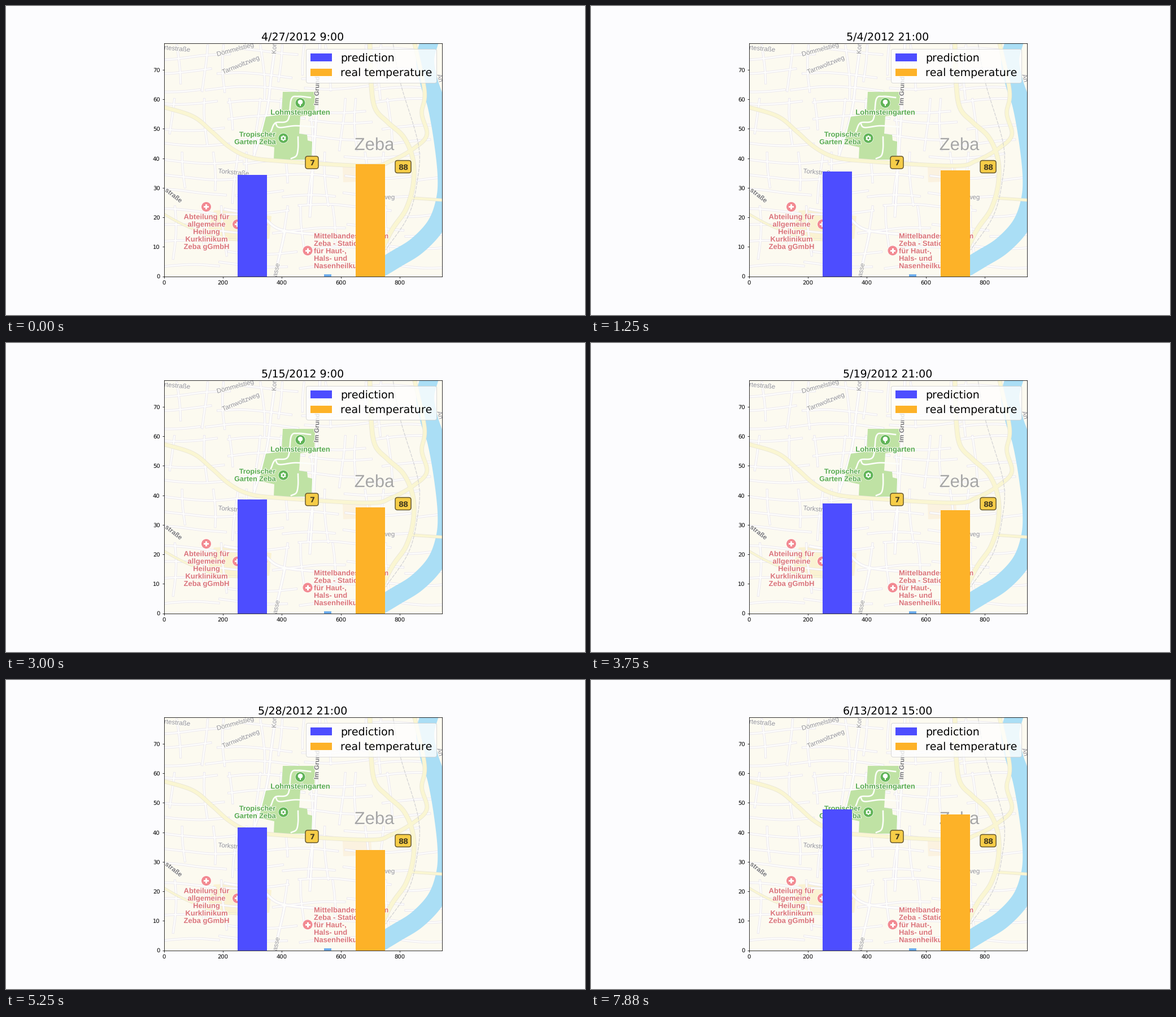
Animation of 1025 by 547 pixels, one loop 8 s. Source, as a matplotlib script:

```python
import numpy as np
import matplotlib.pyplot as plt
from matplotlib.animation import FuncAnimation
from matplotlib.patches import Circle, FancyBboxPatch, Polygon, Rectangle
from matplotlib.patheffects import withStroke

W, H, DPI = 1025, 547, 64
FRAMES, STEP = 64, 125
LEFT, RIGHT, TOP, BOTTOM = 279.5, 771.5, 66, 478.5
PX = 72 / DPI                      # points per pixel
BIG = 19.05 * PX

PAPER, LAND = "#fcfcfe", "#fcfaf0"
BLUE, ORANGE = "#4d4dff", "#fdb228"
GREEN, LEAF, PINK, RED = "#5fb356", "#58aa52", "#f28a92", "#da747b"
GRAY, DARK = "#92929a", "#77777c"

plt.rcParams["text.hinting"] = "none"
plt.rcParams["text.hinting_factor"] = 1
fig = plt.figure(figsize=(W / DPI, H / DPI), dpi=DPI, facecolor=PAPER)
box = [LEFT / W, 1 - BOTTOM / H, (RIGHT - LEFT) / W, (BOTTOM - TOP) / H]
rng = np.random.default_rng(7)

# The map is drawn in stage pixels, the chart above it in data units.
city = fig.add_axes(box, facecolor=LAND)
city.set(xlim=(LEFT, RIGHT), ylim=(BOTTOM, TOP), xticks=[], yticks=[])
city.spines[:].set_visible(False)


def smooth(points, n=10):
    """Catmull-Rom curve through the points."""
    p = np.array(points, float)
    p = np.vstack([2 * p[0] - p[1], p, 2 * p[-1] - p[-2]])
    t = np.linspace(0, 1, n, endpoint=False)[:, None]
    parts = []
    for a, b, c, d in zip(p, p[1:], p[2:], p[3:]):
        parts.append(0.5 * (2 * b + (c - a) * t + (2 * a - 5 * b + 4 * c - d) * t**2
                            + (3 * b - a - 3 * c + d) * t**3))
    return np.vstack(parts + [p[-2:-1]])


def line(points, width, color, z, **kw):
    x, y = smooth(points).T
    city.plot(x, y, color=color, lw=width * PX, zorder=z, **kw)


def street(*points, width=2.4):
    line(points, width + 1.6, "#e8e4ef", 2)
    line(points, width, "#fefefc", 3)


def avenue(*points, width=6):
    line(points, width + 1.6, "#eae6d6", 5)
    line(points, width, "#faf6d2", 5.5)


def area(points, color, z):
    city.add_patch(Polygon(points, fc=color, ec="none", zorder=z))


def disc(x, y, r, color, z=9):
    city.add_patch(Circle((x, y), r, fc=color, ec="none", zorder=z))


def block(x, y, w, h, color="white"):
    city.add_patch(Rectangle((x - w / 2, y - h / 2), w, h, fc=color, zorder=9))


def label(x, y, text, size=11.6, color=GRAY, rot=0, ha="center", weight="normal"):
    t = city.text(x, y, text, fontsize=size * PX, color=color, rotation=rot,
                  ha=ha, va="center", family="Liberation Sans", zorder=9,
                  weight=weight, clip_on=True, rotation_mode="anchor")
    t.set_path_effects([withStroke(linewidth=2 * PX, foreground="#fefdf6")])


def lines(x, y, text, color, ha="center", size=13):
    for i, row in enumerate(text.split("\n")):
        label(x, y + 13.2 * i, row, size, color, ha=ha, weight="bold")


def pin(x, y, color):
    disc(x, y, 9.2, "white", 7)
    disc(x, y, 8.5, color, 8)


def clinic(x, y):
    pin(x, y, PINK)
    block(x, y, 9, 3)
    block(x, y, 3, 9)


def shield(x, y, text, w):
    city.add_patch(FancyBboxPatch((x - w / 2 + 4, y - 7), w - 8, 14,
                                  boxstyle="round,pad=4", fc="#f6cd48",
                                  ec="#66572e", lw=1.5 * PX, zorder=8))
    city.text(x, y + 0.5, text, fontsize=12.5 * PX, weight="bold", color="#453b20",
              ha="center", va="center_baseline", zorder=9)


def draw_side_streets():
    """Loose net of short bent streets."""
    for y in np.arange(84, 470, 31):
        x = LEFT - 20
        while x < 730:
            run = rng.uniform(80, 170)
            xs = x + run * np.linspace(0, 1, 4)
            ys = y + rng.uniform(-9, 9) + 6 * np.sin(xs / 45 + y)
            street(*zip(xs, ys))
            x += run + rng.uniform(0, 25)
    for x in np.arange(306, 700, 46):
        for y in np.arange(70, 440, 95):
            ys = y + rng.uniform(50, 100) * np.linspace(0, 1, 4)
            xs = x + rng.uniform(-14, 14) + 6 * np.sin(ys / 40 + x)
            street(*zip(xs, ys))


def draw_main_roads():
    street((478, 60), (470, 120), (461, 190), (438, 268), width=3.2)
    street((556, 60), (552, 150), (544, 276), (538, 372), width=3.2)
    street((388, 360), (450, 372), (494, 398), (620, 408), width=3.6)
    street((494, 398), (486, 434), (474, 484), width=3.2)
    avenue((272, 177), (330, 195), (364, 222), (396, 250), (430, 267), (480, 274),
           (640, 283), (682, 274), (722, 252), (745, 228), (736, 190), (741, 150), (722, 60))
    avenue((644, 60), (646, 130), (653, 180), (676, 206), (704, 232), (720, 270),
           (721, 315), (708, 360), (680, 402), (640, 485), width=7)
    avenue((272, 364), (316, 388), (372, 410), (408, 414), width=3)
    avenue((720, 340), (778, 344), width=4)
    line([(684, 60), (698, 135), (730, 245), (728, 310), (712, 372), (672, 432)],
         1.2, "#d2d2d4", 6, ls=(0, (5, 1.5)))


def draw_nature():
    line([(751, 58), (742, 95), (749, 135), (762, 175), (773, 235), (780, 300),
          (777, 345), (761, 388), (728, 424), (690, 448), (650, 472)], 32, "#aadef5", 4)
    area([(490, 152), (547, 152), (546, 192), (521, 195), (519, 226), (533, 228),
          (534, 238), (542, 240), (541, 272), (474, 272), (475, 250), (448, 244),
          (460, 196), (488, 192)], "#bfe2a4", 4)
    for path in ([(469, 222), (477, 207), (499, 202), (505, 165), (517, 160), (539, 162)],
                 [(477, 207), (484, 215), (512, 212), (545, 214)],
                 [(517, 232), (517, 252), (514, 265), (505, 270)]):
        line(path, 2.6, "#fdfefa", 4.5)
    area([(368, 362), (412, 360), (470, 372), (466, 412), (392, 414), (358, 394)], "#faf2d2", 1)
    area([(596, 284), (646, 281), (648, 310), (597, 312)], "#fbf2e0", 1)


def draw_labels():
    label(280, 74, "rtestraße", rot=-5, ha="left")
    label(407, 77, "Dömmelstieg", rot=15)
    label(417, 104, "Tarnwoltzweg", rot=22)
    label(475, 85, "Korn", rot=88, ha="left")
    label(550, 176, "Im Grunde", color=DARK, rot=88, ha="left", weight="bold")
    label(404, 295, "Torkstraße", rot=-5)
    label(297, 336, "straße", color=DARK, rot=-38, weight="bold")
    label(667, 339, "weg", ha="left")
    label(479, 467, "asse", rot=78)
    label(768, 128, "An", rot=-75)
    label(652, 247, "Zeba", 31, "#a6a6a6")
    lines(521, 189, "Lohmsteingarten", LEAF)
    lines(480, 228, "Tropischer\nGarten Zeba", LEAF, "right", 12.6)
    lines(355, 374, "Abteilung für\nallgemeine\nHeilung\nKurklinikum\nZeba gGmbH", RED)
    lines(545, 408, "Mittelbandesklinikum\nZeba - Station\nfür Haut-,\nHals- und\n"
          "Nasenheilkunde", RED, "left")


def draw_marks():
    for spot in ((354.5, 355.5), (409.5, 386.5), (454, 387), (534, 433)):
        clinic(*spot)
    pin(521, 171.5, GREEN)
    disc(521, 170, 4.3, "white")
    block(521, 174.5, 2, 5.5)
    pin(491, 234, GREEN)
    for a in np.arange(6) * np.pi / 3:
        disc(491 + 3.2 * np.sin(a), 234 + 3.2 * np.cos(a), 1.7, "white")
    disc(491, 234, 1.4, GREEN, 10)
    block(569.5, 480, 13, 11, "#6aaaea")
    shield(541.5, 277, "7", 23)
    shield(703, 284.5, "88", 28)


draw_side_streets()
draw_main_roads()
draw_nature()
draw_labels()
draw_marks()

ax = fig.add_axes(box, facecolor="none")
guess, = ax.bar(300, 0, 100, color=BLUE, label="prediction")
real, = ax.bar(700, 0, 100, color=ORANGE, label="real temperature")
ax.set(xlim=(0, 942), ylim=(0, 79), xticks=range(0, 801, 200), yticks=range(0, 71, 10))
ax.tick_params(labelsize=9.65 * PX, length=3.4 * PX, width=0.8 * PX, pad=3.4 * PX)
ax.spines[:].set_linewidth(0.8 * PX)
ax.legend(loc="upper right", fontsize=BIG, labelspacing=0.42)
title = ax.set_title("", fontsize=BIG, pad=5.8 * PX)

# Slow trend plus a swing for the hour: 9:00, 3:00, 21:00, 15:00.
GUESS_TREND = [(0, 34.3), (10, 36.5), (18, 38.8), (30, 38.2), (42, 42.6), (52, 45.5), (63, 45.8)]
REAL_TREND = [(0, 38), (10, 37), (35, 36), (37, 28), (42, 35), (52, 44), (57, 36), (63, 43)]
GUESS_SWING = (0, -3, -1, 2)
REAL_SWING = (0, -4, -1, 3)


def reading(trend, swing, k):
    return np.interp(k, *zip(*trend)) + swing[k % 4]


def stamp(k):
    days, hour = divmod(9 + 18 * k, 24)
    month, day = 4, 27 + days
    for length in (30, 31):
        if day <= length:
            break
        month, day = month + 1, day - length
    return f"{month}/{day}/2012 {hour}:00"


def update(k):
    guess.set_height(reading(GUESS_TREND, GUESS_SWING, k))
    real.set_height(round(reading(REAL_TREND, REAL_SWING, k)))
    title.set_text(stamp(k))
    return guess, real, title


anim = FuncAnimation(fig, update, frames=FRAMES, interval=STEP, repeat=True,
                     repeat_delay=0, blit=False)
plt.show()
```
